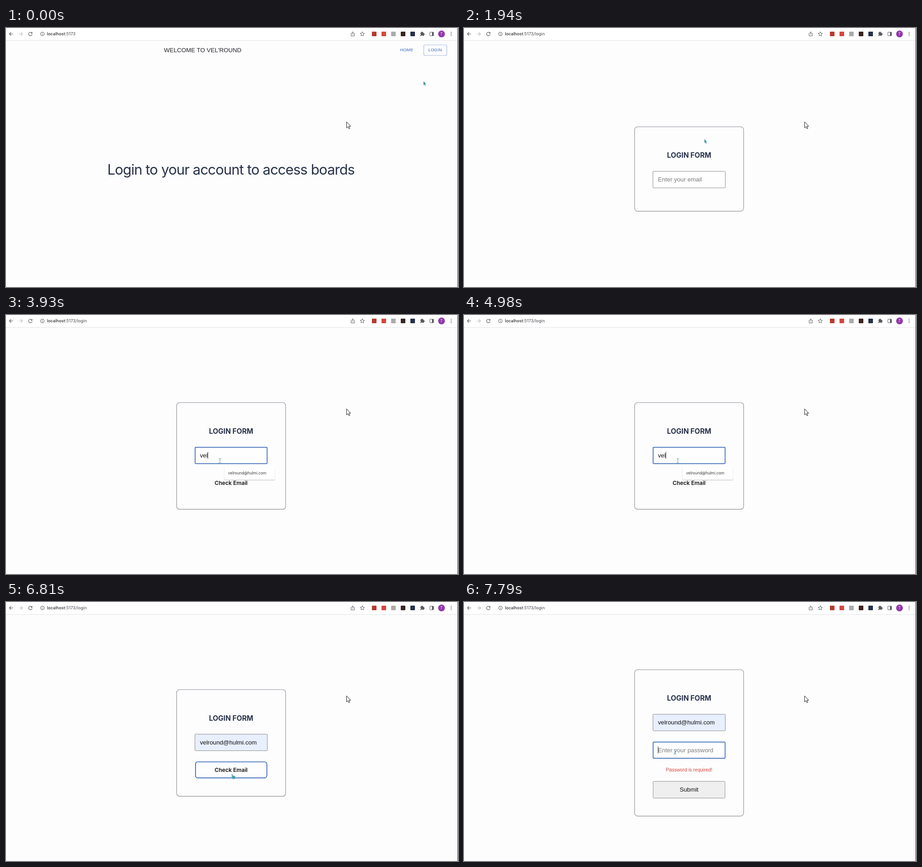
An HTML page that plays this animation: 987 px wide and 567 px high, repeating every 8000 ms.

```html
<!DOCTYPE html>
<html lang="en">
<head>
<meta charset="utf-8">
<title>Login form</title>
<style>
  html, body { margin: 0; width: 100%; height: 100%; overflow: hidden; background: #fdfdfe; }
  svg { display: block; width: 987px; height: 567px; }
  text { white-space: pre; }
  .ui { font-family: Inter, "Open Sans", sans-serif; }
  .arial { font-family: "Liberation Sans", Arial, sans-serif; }
  .mid { text-anchor: middle; }
</style>
</head>
<body>
<svg id="stage" viewBox="0 0 987 567" xmlns="http://www.w3.org/2000/svg">
  <rect width="987" height="567" fill="#fdfdfe"/>
  <rect width="987" height="27" fill="#fff"/>
  <path d="M0 27.2H987" stroke="#e3e3e7"/>
  <g id="tools"></g>
  <g id="page"></g>
  <path d="M743.7 205.5v13.2l3-2.8 2 4.6 2.1-.9-2-4.5h3.9z" fill="#fff" stroke="#1c1c20" stroke-width="1" stroke-linejoin="round"/>
  <g id="pointer"></g>
  <path d="M986.5 0V567" stroke="#3a3a3d"/>
</svg>
<script>
const LOOP = 8000;
const INK = '#273248', BLUE = '#3c6ab6', GREY = '#8b8b8f', TEAL = '#339092', FILLED = '#e8effd';
const EMAIL = 'velround@hulmi.com';
const SAVED = ['tavri.selnu@ostavell.edu', 'zcs350617@ostavell.edu', 'tavriselnu.ok@hulmi.com',
  '+999555010342', 'info@vimel.com', 'tavri.selnu.04.17@hulmi.com'];

const $ = id => document.getElementById(id);
const pen = document.createElement('canvas').getContext('2d');
pen.font = '13.2px "Liberation Sans", Arial, sans-serif';

// Last value whose start time has passed; keys are [time, ...values].
const at = (t, keys) => keys.filter(k => k[0] <= t).pop().slice(1);

const text = (s, x, y, size, fill, cls, more = '') =>
  `<text class="${cls}" x="${x}" y="${y}" font-size="${size}" fill="${fill}" ${more}>${s}</text>`;
const box = (x, y, w, h, r, fill, stroke = 'none', sw = 1) =>
  `<rect x="${x}" y="${y}" width="${w}" height="${h}" rx="${r}" fill="${fill}" stroke="${stroke}" stroke-width="${sw}"/>`;
const line = (d, stroke, sw = 1.1) =>
  `<path d="${d}" fill="none" stroke="${stroke}" stroke-width="${sw}" stroke-linejoin="round"/>`;

function star(cx, cy, r) {
  let d = '';
  for (let i = 0; i < 10; i++) {
    const a = (i / 5 - 0.5) * Math.PI, q = i % 2 ? r * 0.45 : r;
    d += `${i ? 'L' : 'M'}${cx + q * Math.cos(a)} ${cy + q * Math.sin(a)}`;
  }
  return line(d + 'Z', '#5f6368', 1);
}

function toolbar() {
  const dark = '#55585c', pale = '#b9bbbe';
  const icons = [[804, '#b8392f'], [825, '#d8453f'], [846, '#ababab'], [867, '#3a2420'], [888, '#24304d']];
  return line('M15.5 13H7.5M11.3 9.2L7.5 13l3.8 3.8', dark)
    + line('M28 13h8M32.2 9.2L36 13l-3.8 3.8', pale)
    + line('M56 10.3A3.9 3.9 0 1 0 57.1 14', dark) + '<path d="M57.5 8.6v3.6h-3.6z" fill="#55585c"/>'
    + `<circle cx="79.5" cy="13" r="4" fill="none" stroke="${dark}"/>`
    + line('M79.5 12.6v2.6M79.5 10.6v1.1', dark, 1)
    + line('M755 11.7h-1.4v5.6h7v-5.6h-1.4M757.1 14.5V8.6M755 10.5l2.1-2 2.1 2', dark, 1)
    + star(778, 13.2, 5)
    + icons.map(([x, c]) => box(x - 5, 8, 10, 10, 1, c)).join('')
    + box(904.8, 10, 7.4, 7.5, 1, dark)
    + `<circle cx="908.4" cy="9.7" r="1.7" fill="${dark}"/><circle cx="912.6" cy="13.6" r="1.7" fill="${dark}"/>`
    + '<circle cx="904.8" cy="13.8" r="1.4" fill="#fff"/><circle cx="908.4" cy="17.5" r="1.4" fill="#fff"/>'
    + box(925.6, 9.2, 8, 7.8, .6, 'none', dark) + box(930.2, 9, 3.6, 8, .4, dark)
    + '<circle cx="951" cy="13" r="7.4" fill="#9237aa"/>'
    + text('T', 951, 16, 8.3, '#f3e4f7', 'ui mid')
    + [9.4, 13, 16.6].map(y => `<circle cx="972" cy="${y}" r="1" fill="${dark}"/>`).join('');
}

function address(path) {
  return text(`localhost<tspan fill="#606367">:5173${path}</tspan>`, 89.5, 16.2, 9.1, '#2a2b2e', 'ui', 'font-weight="500"');
}

function home(t) {
  const [fill, edge, sw] = at(t, [
    [0, 'none', '#a7bcdf', 1.2], [1020, '#f8f9fd', '#7c9cd6', 1.2],
    [1140, '#eff2fa', '#5d86cf', 1.2], [1290, '#ebeef5', '#416fc6', 1.6]]);
  const spaced = 'letter-spacing=".2" stroke="#5b83c4" stroke-width=".2"';
  return address('')
    + text("WELCOME TO VEL'ROUND", 429.5, 52.7, 13.2, '#25262a', 'arial mid')
    + text('HOME', 875, 51.4, 9.24, '#5b83c4', 'arial mid', spaced)
    + (t >= 1290 ? box(908, 36, 57, 33, 0, '#f7f7f9') : '')
    + box(912.3, 37, 50.2, 23, 2.6, fill, edge, sw)
    + text('LOGIN', 937.2, 51.4, 9.24, '#5b83c4', 'arial mid', spaced)
    + text('Login to your account to access boards', 491.2, 321, 30.7, INK, 'ui mid', 'letter-spacing="-.88"');
}

function field(y, { value = '', hint = '', focus = false, auto = false, caret = false, tint = '#111' }) {
  const fill = auto ? FILLED : '#fefefe';
  const frame = focus ? box(413, y + .5, 157.2, 35.6, 1.2, fill, BLUE, 1.7)
                      : box(412.6, y + .1, 158, 36.2, 1.2, fill, GREY, 1);
  const end = 423.9 + (value ? pen.measureText(value).width : 0);
  return frame
    + text(value || hint, 423.5, y + 22.6, 13.2, value ? tint : '#7b7b7f', 'arial')
    + (caret ? line(`M${end} ${y + 10.5}v15`, '#222', 1) : '');
}

function suggestions(y, rows, width, hover) {
  const h = rows.length * 23.55 + 5.5;
  return box(476.6, y + 1, width + .8, h + .4, 2, '#d4d4d7')
    + box(477, y - .4, width, h + .2, 1.5, '#fff')
    + (hover ? box(477, y + 2.8, width, 23.5, 0, '#e8e9ec') : '')
    + rows.map((s, i) => text(s, 485, y + 17.5 + i * 23.55, 8.4, '#36373a', 'ui')).join('');
}

function login(t) {
  const [top, height] = at(t, [[0, 216.3, 184.8], [3930, 191.8, 233.6], [7100, 162, 293.5], [7220, 148.3, 320.3]]);
  const [typed] = at(t, [[0, 0], [3510, 1], [3650, 2], [3930, 3], [5250, EMAIL.length]]);
  const [caret] = at(t, [[0, 0], [2430, 1], [2980, 0], [3510, 1], [4480, 0], [4980, 1], [5250, 0],
    [5630, 1], [6020, 0], [6520, 1], [6670, 0], [7640, 1]]);
  const preview = t >= 5250 && t < 5630;
  const secret = t >= 7100, error = t >= 7220;
  const y = top + 97.4;

  let out = address('/login')
    + box(372.6, top, 238, height, 6.5, 'none', '#8d8e92', 1.1)
    + text('LOGIN FORM', 491.5, top + 67.9, 15.4, INK, 'ui mid', 'font-weight="700"')
    + field(y, {
      value: EMAIL.slice(0, typed), hint: 'Enter your email', auto: t >= 5250,
      focus: t >= 2430 && t < 6670, caret: caret && !secret, tint: preview ? '#333' : '#111'
    });

  if (secret) {
    const low = top + (error ? 244.3 : 217.8);
    out += field(y + 60.4, { hint: 'Enter your password', focus: t >= 7490, caret })
      + (error ? text('Password is required!', 491.5, top + 222.9, 10.56, '#d8423c', 'arial mid') : '')
      + box(413, low, 157, 36.6, 1.6, '#f0eff0', '#8f8f92', 1)
      + text('Submit', 491.5, low + 22.8, 13.2, '#111', 'arial mid');
  } else if (t >= 3930) {
    const [edge, sw] = at(t, [[0, 'none', 1], [6400, '#9db4dc', 1.2], [6520, '#4a73bd', 1.2], [6670, '#3364b4', 1.7]]);
    out += box(413.8, top + 158.2, 155.8, 35.2, 5, 'none', edge, sw)
      + text('Check Email', 491.5, top + 180.6, 12.1, '#111', 'ui mid', 'font-weight="600"');
  }

  if (t >= 2430 && t < 3510) out += suggestions(y + 42.5, SAVED, 141, false);
  if (t >= 3510 && t < 5630) out += suggestions(y + 42.5, [EMAIL], 110, preview);
  return out;
}

const shapes = {
  arrow: `<path d="M.3 0v9l1.9-1.6 1.5 3 1.5-.7-1.4-2.9 2.6-.1z" fill="${TEAL}" stroke="#d5e4e9" stroke-width=".6"/>`,
  beam: line('M-2.5 -5.2Q0 -5.2 0 -3.6V3.6Q0 5.2 -2.5 5.2M2.5 -5.2Q0 -5.2 0 -3.6M0 3.6Q0 5.2 2.5 5.2', '#7fb4c0', 1.3),
  hand: `<path d="M-3.6 -5q1.2 -1.2 1.9 .2l1 2.6 4 .7q1.5 .4 1.3 2L3.9 5h-5.6L-4.5 1.2q-.2 -1.4 1.6 -.6z" fill="#4a9dab" stroke="#b5d5dc" stroke-width=".6"/>`
};

function pointer(t) {
  const [shape, x, y] = at(t, [
    [0, 'arrow', 911.3, 116.3], [900, 'arrow', 918, 100], [1020, 'arrow', 932, 70], [1140, 'arrow', 940, 55.3],
    [1790, 'arrow', 867.6, 96], [1940, 'arrow', 524.6, 243], [2190, 'arrow', 484, 290], [2310, 'beam', 467, 319],
    [5130, 'arrow', 480, 334], [5250, 'arrow', 498, 344], [5370, 'arrow', 504.8, 346],
    [6280, 'arrow', 501, 361], [6400, 'hand', 498, 380], [6520, 'hand', 497, 386], [6670, 'hand', 496.3, 382.4],
    [7370, 'beam', 472, 347], [7490, 'beam', 460.3, 327.6]]);
  return `<g transform="translate(${x} ${y})">${shapes[shape]}</g>`;
}

const shown = {};
function put(id, markup) {
  if (shown[id] !== markup) $(id).innerHTML = shown[id] = markup;
}

function draw(t) {
  put('page', t < 1540 ? home(t) : login(t));
  put('pointer', pointer(t));
}

put('tools', toolbar());
const start = performance.now();
function tick() {
  draw((performance.now() - start) % LOOP);
  requestAnimationFrame(tick);
}
tick();
</script>
</body>
</html>
```
